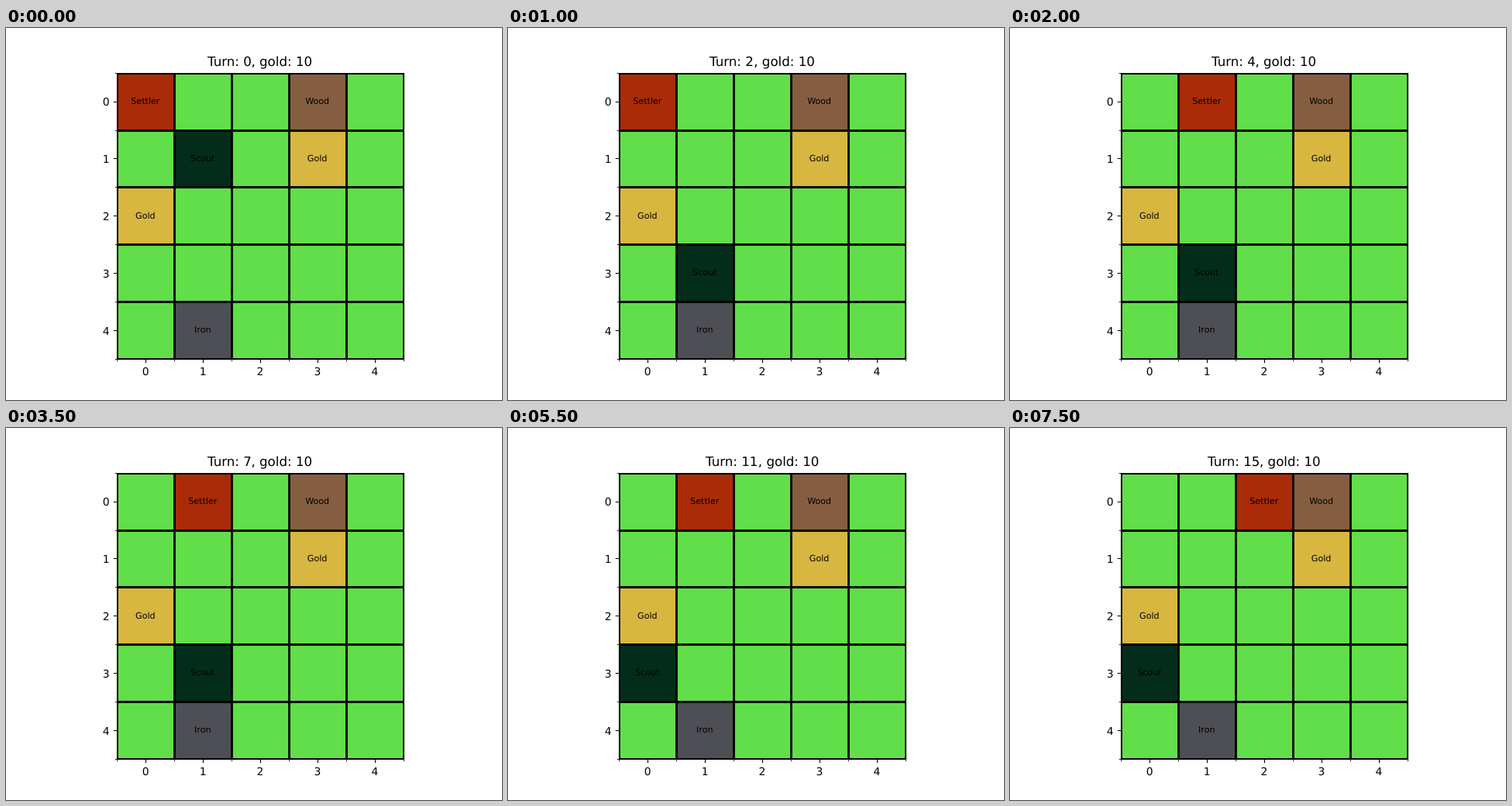
An HTML page that plays this animation: 640 px wide and 480 px high, repeating every 8000 ms.

```html
<!DOCTYPE html>
<html lang="en">
<head>
<meta charset="utf-8">
<title>Grid turns</title>
<style>
  html, body { margin: 0; width: 100%; height: 100%; overflow: hidden; background: #fff; }
  svg { display: block; }
  text { font-family: "DejaVu Sans", sans-serif; text-rendering: geometricPrecision; white-space: pre; }
  .title { font-size: 16.667px; }
  .tick { font-size: 13.889px; }
  .name { font-size: 11.111px; text-anchor: middle; }
</style>
</head>
<body>
<svg id="stage" width="640" height="480" viewBox="0 0 640 480"></svg>
<script>
const LEFT = 143.2, TOP = 57.6, CELL = 73.92, SIZE = 5;
const TURN_MS = 500, LOOP_MS = 8000;
const stage = document.getElementById("stage");

function add(parent, tag, attrs, content = "") {
  const node = document.createElementNS("http://www.w3.org/2000/svg", tag);
  for (const key in attrs) node.setAttribute(key, attrs[key]);
  node.textContent = content;
  return parent.appendChild(node);
}

const snap = v => Math.round(v) + 0.5;
const edgeX = i => Math.round(LEFT + i * CELL);
const edgeY = i => Math.round(TOP + i * CELL);
const line = (parent, d, width) =>
  add(parent, "path", { d, stroke: "#000", "stroke-width": width, fill: "none" });

// Board
const clip = add(add(stage, "defs", {}), "clipPath", { id: "board" });
add(clip, "rect", { x: 143, y: 58, width: 370, height: 370 });
const board = add(stage, "g", { "clip-path": "url(#board)" });
add(board, "rect", { x: 143, y: 58, width: 370, height: 370, fill: "#62de4a" });
const tiles = add(board, "g", {});
const grid = add(board, "g", {});
const labels = add(stage, "g", {});

function makeTile(name, color, col = 0, row = 0) {
  const rect = add(tiles, "rect", { fill: color });
  const label = add(labels, "text", { class: "name" }, name);
  const moveTo = (c, r) => {
    const x = edgeX(c), y = edgeY(r);
    rect.setAttribute("x", x);
    rect.setAttribute("y", y);
    rect.setAttribute("width", edgeX(c + 1) - x);
    rect.setAttribute("height", edgeY(r + 1) - y);
    label.setAttribute("x", LEFT + (c + 0.5) * CELL - 0.3);
    label.setAttribute("y", Math.round(TOP + (r + 0.5) * CELL + 3.15));
  };
  moveTo(col, row);
  return moveTo;
}

makeTile("Wood", "#855e42", 3, 0);
makeTile("Gold", "#d8b740", 3, 1);
makeTile("Gold", "#d8b740", 0, 2);
makeTile("Iron", "#4e4f54", 1, 4);
const moveSettler = makeTile("Settler", "#aa2b08");
const moveScout = makeTile("Scout", "#032d1a");

// Grid lines, ticks and axis numbers
for (let i = 0; i <= SIZE; i++) {
  const x = snap(LEFT + i * CELL), y = snap(TOP + i * CELL);
  line(grid, `M${x} 58V428M143 ${y}H513`, 2.78);
  line(stage, `M${x} 427.5v2.78M143.5 ${y}h-2.78`, 0.83);
}
for (let i = 0; i < SIZE; i++) {
  const x = LEFT + (i + 0.5) * CELL, y = TOP + (i + 0.5) * CELL;
  line(stage, `M${snap(x)} 427.5v4.86M143.5 ${snap(y)}h-4.86`, 1.11);
  add(stage, "text", { class: "tick", x: x, y: 448, "text-anchor": "middle" }, i);
  add(stage, "text", { class: "tick", x: 133.5, y: Math.round(y + 5.28), "text-anchor": "end" }, i);
}
line(stage, "M143.5 58.5H513.5V427.5H143.5Z", 1.11);

// Title
const title = add(stage, "text", { class: "title", y: 49 });
const turnText = add(title, "tspan", {});
const goldText = add(title, "tspan", {}, ", gold: 10");

function render(time) {
  const turn = Math.floor((time % LOOP_MS) / TURN_MS);
  const digit = turn % 10;
  title.setAttribute("x", turn < 10 ? 260 : 255);
  turnText.textContent = `Turn: ${turn}`;
  goldText.setAttribute("dx", digit >= 1 && digit <= 3 ? 0.4 : -0.4);
  moveSettler(turn < 3 ? 0 : turn < 12 ? 1 : 2, 0);
  moveScout(turn < 11 ? 1 : 0, turn < 2 ? 1 : 3);
}

const start = performance.now();
function tick() {
  render(performance.now() - start);
  requestAnimationFrame(tick);
}
render(0);
requestAnimationFrame(tick);
</script>
</body>
</html>
```
